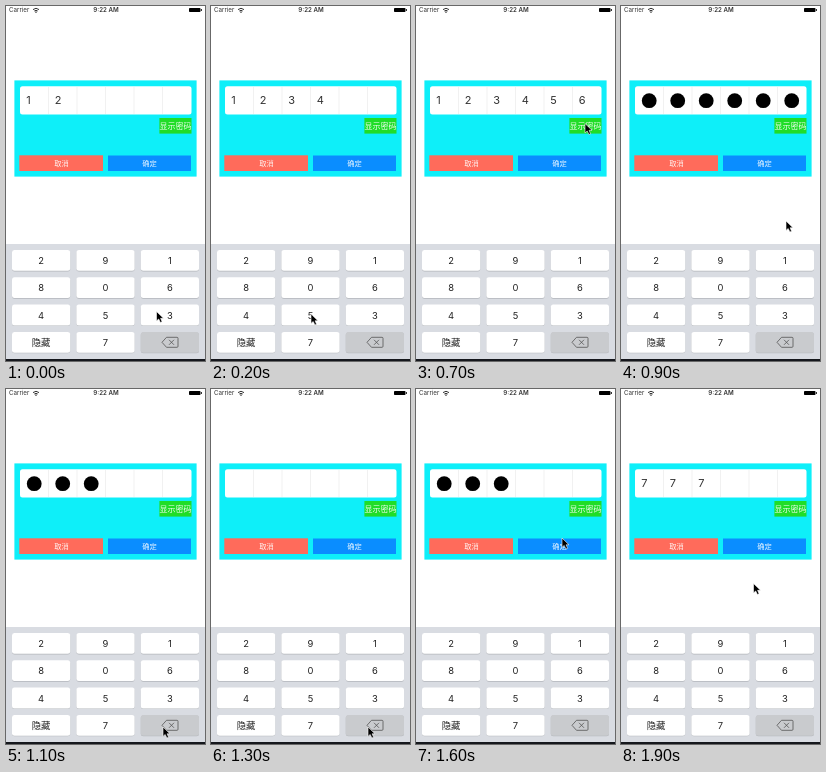
An HTML page that plays this animation: 199x355 px, repeating every 2 s.

```html
<!DOCTYPE html>
<html lang="zh-CN">
<head>
<meta charset="utf-8">
<title>Password keypad</title>
<style>
  html, body { margin: 0; width: 100%; height: 100%; overflow: hidden; background: #fff; }
  svg { display: block; width: 100%; height: 100%; }
  text { font-family: Inter, "Noto Sans CJK SC", "Noto Sans CJK", sans-serif; }
  .mid { text-anchor: middle; }
  .label { fill: #fff; fill-opacity: .9; text-anchor: middle; }
</style>
</head>
<body>
<svg viewBox="0 0 199 355">
  <rect width="199" height="355" fill="#fff"/>

  <!-- status bar -->
  <g font-size="6.2" fill="#333">
    <text x="3" y="6.4">Carrier</text>
    <text class="mid" x="100" y="6.4" font-weight="600">9:22 AM</text>
    <g fill="none" stroke="#333">
      <path d="M27 3.6Q30 .9 33 3.6M28.3 5Q30 3.5 31.7 5" stroke-width="1"/>
      <circle cx="30" cy="6.1" r=".4"/>
    </g>
    <rect x="183" y="2" width="11.5" height="4" rx=".8" fill="#000"/>
    <rect x="195" y="3" width="1" height="2"/>
  </g>

  <!-- password panel -->
  <rect x="8.4" y="74.4" width="182.2" height="96.2" fill="#0eeff9"/>
  <rect x="14" y="80.3" width="171.5" height="28.2" rx="2.5" fill="#fff"/>
  <g id="dividers" stroke="#eee" stroke-width=".8"></g>
  <g id="entry"></g>
  <rect x="153.4" y="112" width="32.1" height="15.6" fill="#20dd28"/>
  <text class="label" x="169.5" y="123" font-size="8">显示密码</text>
  <rect x="13.3" y="149.3" width="83.7" height="15.7" fill="#ff6b5b"/>
  <text class="label" x="55.5" y="160.2" font-size="7.3">取消</text>
  <rect x="102" y="149.5" width="83" height="15.5" fill="#0a8dff"/>
  <text class="label" x="143.5" y="160.2" font-size="7.3">确定</text>

  <!-- keyboard -->
  <rect y="238" width="199" height="115" fill="#d9dce2"/>
  <rect y="353" width="199" height="2" fill="#15171c"/>
  <g id="keys"></g>
  <path d="M156 336.3L160.5 331.3H171Q172 331.3 172 332.3V340.3Q172 341.3 171 341.3H160.5ZM163 333.8L168 338.8M168 333.8L163 338.8"
        fill="none" stroke="#555" stroke-width=".8"/>

  <path id="cursor" d="M0 0V9.4L2.2 7.5L3.9 11L5.6 10.3L4.1 6.8H7Z"
        fill="#000" stroke="#fff" stroke-width=".6"/>
</svg>

<script>
const byId = id => document.getElementById(id);
const CELL = 28.5;
const STEP = 100;

// Each pose: pointer x, pointer y, typed digits, masked
const poses = [
  [150.5, 305.5, "12"],
  [38, 308, "123"],
  [100, 308, "1234"],
  [165, 282, "123456"],
  [157.5, 123.5, "123456"],
  [164, 119, "123456", true],
  [169, 117.5, "123456"],
  [169, 117.5, "123456"],
  [169, 117.5, "123456", true],
  [165, 215, "123456", true],
  [157, 338, "12345", true],
  [157, 338, "123", true],
  [157, 338, "1", true],
  [157, 338, ""],
  [100, 337, "7", true],
  [100, 337, "777", true],
  [146, 149, "777", true],
  [165, 122, "777", true],
  [174, 117, "777"],
  [132.5, 194.5, "777"]
];

byId("dividers").innerHTML = [1, 2, 3, 4, 5]
  .map(i => `<path d="M${14 + CELL * i} 81V108"/>`).join("");

byId("keys").innerHTML = [..."291806453", "隐藏", "7", ""].map((label, i) => {
  const x = 6 + (i % 3) * 64.4;
  const y = 244 + Math.floor(i / 3) * 27.3;
  const box = (top, fill) =>
    `<rect x="${x}" y="${top}" width="58.2" height="20.8" rx="2.5" fill="${fill}"/>`;
  return box(y + .6, "#b4b7bc") + box(y, label ? "#fff" : "#c9cbce") +
    `<text class="mid" x="${x + 29.1}" y="${y + 14}" font-size="9.4" fill="#222">${label}</text>`;
}).join("");

function entryMark(digit, i, masked) {
  const x = 14 + CELL * i;
  return masked
    ? `<circle cx="${x + 14.2}" cy="94.7" r="7.4"/>`
    : `<text x="${x + 6.3}" y="98" font-size="11" fill="#333">${digit}</text>`;
}

let shown = -1;
function draw(now) {
  const step = Math.floor(now / STEP) % poses.length;
  if (step !== shown) {
    const [x, y, digits, masked] = poses[step];
    byId("entry").innerHTML = [...digits].map((d, i) => entryMark(d, i, masked)).join("");
    byId("cursor").setAttribute("transform", `translate(${x} ${y})`);
    shown = step;
  }
}

let start;
function tick(now) {
  start ??= now;
  draw(now - start);
  requestAnimationFrame(tick);
}
draw(0);
requestAnimationFrame(tick);
</script>
</body>
</html>
```
